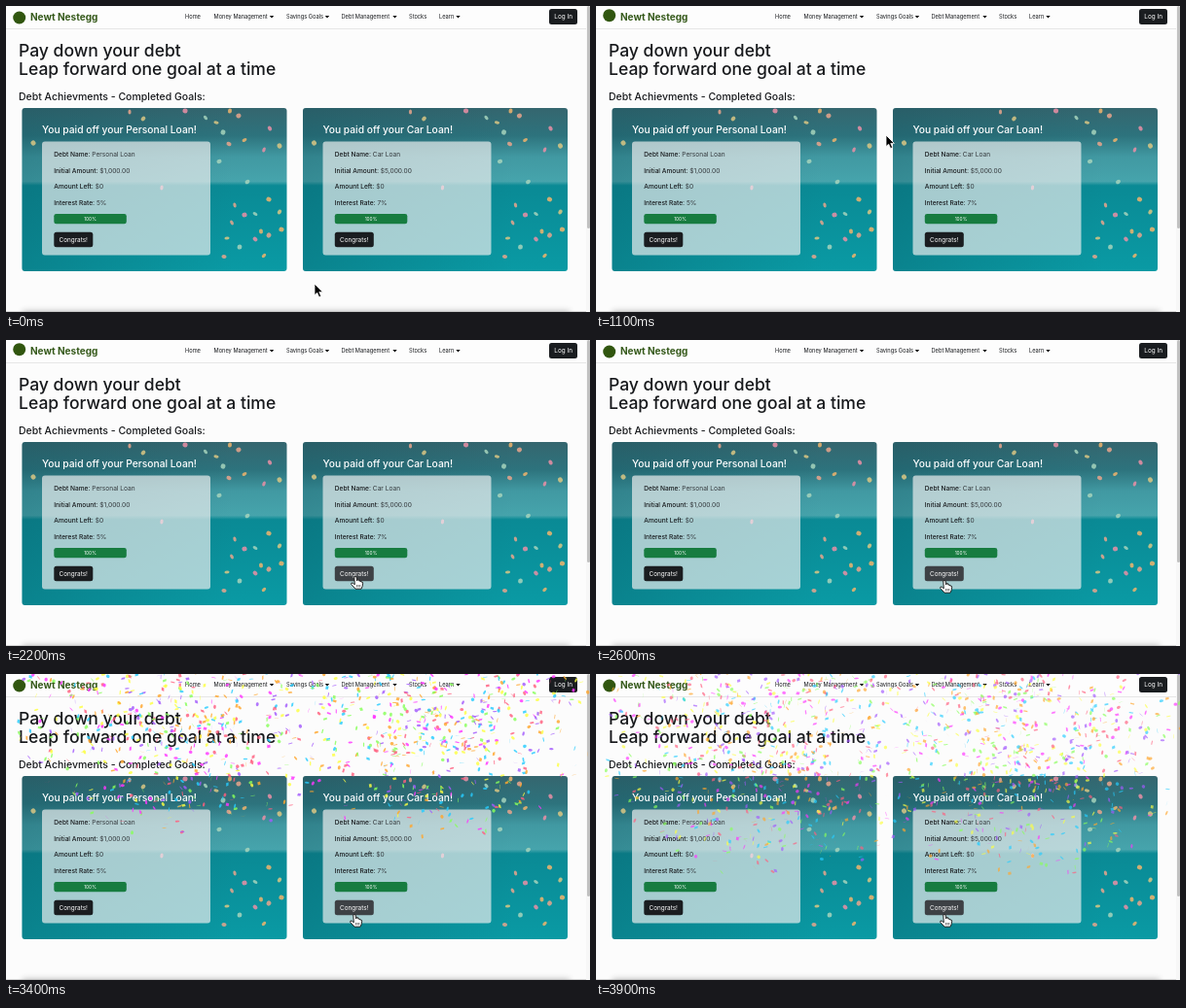
An HTML page with a canvas that plays this animation: 600x315 px, repeating every 4 s.

```html
<!DOCTYPE html>
<html lang="en">
<head>
<meta charset="utf-8">
<title>Debt goals</title>
<style>
  html, body { margin: 0; width: 100%; height: 100%; overflow: hidden; background: #fcfcfc; }
  svg, canvas { position: absolute; left: 0; top: 0; width: 600px; height: 315px; }
  text { font-family: Inter, sans-serif; fill: #17191c; }
  .h1 { font-size: 17.55px; font-weight: 500; }
  .h2 { font-size: 10.5px; font-weight: 500; }
  .title { font-size: 10.25px; font-weight: 500; fill: #fff; }
  .nav { font-size: 5.7px; }
  .row { font-size: 6.6px; }
  .label { font-weight: 500; }
  .value { fill: #33383c; }
  .button { font-size: 6.4px; fill: #fff; }
  .percent { font-size: 4.8px; fill: #fff; text-anchor: middle; }
  .brand { font-size: 10px; font-weight: 700; fill: #35591a; }
</style>
</head>
<body>
<svg viewBox="0 0 600 315">
  <defs>
    <linearGradient id="photo" x2="0" y2="1">
      <stop offset="0" stop-color="#35666f"/>
      <stop offset=".17" stop-color="#2d737d"/>
      <stop offset=".3" stop-color="#4199a2"/>
      <stop offset=".45" stop-color="#46a4ac"/>
      <stop offset=".475" stop-color="#0a8a95"/>
      <stop offset="1" stop-color="#0a9aa4"/>
    </linearGradient>
    <linearGradient id="shade">
      <stop offset="0" stop-color="#0a4a55" stop-opacity=".28"/>
      <stop offset=".8" stop-color="#0a4a55" stop-opacity="0"/>
    </linearGradient>
    <filter id="blur" x="-10%" y="-200%" width="120%" height="500%">
      <feGaussianBlur stdDeviation="3"/>
    </filter>
  </defs>
  <rect width="600" height="23" fill="#fdfdfd"/>
  <path d="M0 23.5H597" stroke="#e6e6e6"/>
  <circle id="logo" cx="13.7" cy="12" r="6.5" fill="#31560f"/>
  <text class="brand" x="25" y="15">Newt Nestegg</text>
  <g id="nav"></g>
  <rect x="558" y="3" width="29" height="16" rx="2.5" fill="#1a1d20"/>
  <text class="button" x="563.3" y="13.3">Log In</text>
  <text class="h1" x="13" y="51.5">Pay down your debt</text>
  <text class="h1" x="13" y="71.3">Leap forward one goal at a time</text>
  <text class="h2" x="13" y="97">Debt Achievments - Completed Goals:</text>
  <g id="cards"></g>
  <rect x="17" y="314" width="562" height="10" opacity=".25" filter="url(#blur)"/>
  <path d="M0 314.5H597" stroke="#bbb" stroke-opacity=".6"/>
  <rect x="596" width="4" height="315" fill="#f7f7f7"/>
  <rect x="597" width="3" height="229" rx="1.5" fill="#c1c1c1"/>
</svg>
<canvas width="600" height="315"></canvas>
<svg viewBox="0 0 600 315">
  <path id="arrow" d="M0 0V11.6L2.7 9.2 4.6 13.6 6.7 12.7 4.8 8.4H8.4Z" stroke="#fff" stroke-width=".8"/>
  <g id="hand" fill="#fff" stroke="#111" stroke-width=".9" stroke-linejoin="round">
    <path d="M-1.2 0Q0-1.4 1.1 0L1.7 4Q3-.1 3.9 4.2 5.2 3.2 5.9 5 7.4 4.4 7.6 6.2L7.2 9.4 6 12.2H0L-4.3 7.4Q-4.6 5.5-2.7 6.2L-.7 7.8Z"/>
    <path d="M1.6 8V10.4M3.2 8V10.4M4.8 8V10.4" fill="none" stroke-width=".6"/>
  </g>
</svg>
<script>
const LOOP = 4000, STEP = 100, BURST = 2800, SCALE = 600 / 1440;
const $ = id => document.getElementById(id);
const ctx = document.querySelector('canvas').getContext('2d');

let seed = 11;
const random = () => (seed = seed * 16807 % 2147483647) / 2147483647;

// Static page
const navItems = [['Home', 184], ['Money Management', 213.5, 273], ['Savings Goals', 288, 330],
  ['Debt Management', 344.5, 399.5], ['Stocks', 414], ['Learn', 445, 464.5]];
$('nav').innerHTML = navItems.map(([label, x, caret]) =>
  `<text class="nav" x="${x}" y="13">${label}</text>` +
  (caret ? `<path d="M${caret - 2.2} 10h4.4l-2.2 2.6z"/>` : '')).join('');

const specks = [[127, 109], [141, 116], [184, 108], [205, 115], [230, 108], [239, 113], [216, 120],
  [271, 126], [223, 130], [245, 138], [229, 142], [281, 144], [265, 148], [219, 160], [270, 199],
  [235, 205], [281, 212], [245, 215], [256, 214], [262, 232], [270, 236], [227, 239], [256, 240],
  [240, 248], [265, 257], [224, 258], [28, 141], [160, 187], [248, 181], [283, 230], [232, 223]];
const speckColors = ['#e9a58c', '#d9c784', '#ea8fa6', '#a6d3bc', '#f0b46c'];
const speckMarkup = specks.map(([x, y], i) =>
  `<ellipse cx="${x}" cy="${y}" rx="${1.6 + i % 3 * .4}" ry="2.6" fill="${speckColors[i % 5]}"
    opacity=".85" transform="rotate(${i * 47} ${x} ${y})"/>`).join('');

function card(name, amount, rate, x, id) {
  const rows = [['Debt Name', name + ' Loan'], ['Initial Amount', amount], ['Amount Left', '$0'], ['Interest Rate', rate]];
  return `<g transform="translate(${x})">
    <rect x="16.5" y="105" width="272" height="168" rx="3" fill="url(#photo)"/>
    <rect x="16.5" y="105" width="272" height="168" rx="3" fill="url(#shade)"/>
    ${speckMarkup}
    <text class="title" x="37" y="131">You paid off your ${name} Loan!</text>
    <rect x="37" y="139.5" width="173" height="117" rx="3" fill="#f1f1f1" fill-opacity=".68"/>
    ${rows.map(([label, value], i) => `<text class="row" x="49.3" y="${155.2 + i * 16.55}"><tspan
      class="label">${label}:</tspan> <tspan class="value">${value}</tspan></text>`).join('')}
    <rect x="49.3" y="214" width="74.5" height="10.3" rx="2.3" fill="#177c40"/>
    <text class="percent" x="86.5" y="221">100%</text>
    <rect id="${id}" x="49.3" y="232.7" width="40" height="15.6" rx="2.5" fill="#1a1d20"/>
    <text class="button" x="54.5" y="242.8">Congrats!</text>
  </g>`;
}
$('cards').innerHTML = card('Personal', '$1,000.00', '5%', 0, 'firstButton') +
  card('Car', '$5,000.00', '7%', 288.5, 'secondButton');

// Radial bursts from just above the top edge, in 1440px page units
const colors = ['#26ccff', '#a25afd', '#ff5e7e', '#88ff5a', '#fcff42', '#ffa62d', '#ff36ff'];
const origins = [365, 500, 995, 1120];
const pieces = Array.from({ length: 1800 }, (_, i) => ({
  x: origins[i % origins.length],
  y: -60,
  angle: random() * Math.PI * 2,
  speed: 6 + random() * 30,
  wobble: random() * 10,
  wobbleSpeed: Math.min(.11, random() * .1 + .05),
  tilt: (random() * .5 + .25) * Math.PI,
  size: random() + 2,
  round: random() < .5,
  color: colors[i % colors.length]
}));

function drawPiece(p, ticks) {
  const reach = p.speed * 10 * (1 - .9 ** ticks);
  const x = p.x + Math.cos(p.angle) * reach;
  const y = p.y + Math.sin(p.angle) * reach + 3 * ticks;
  const wobble = p.wobble + p.wobbleSpeed * ticks, tilt = p.tilt + .1 * ticks;
  const wx = x + 10 * Math.cos(wobble), wy = y + 10 * Math.sin(wobble);
  const dx = p.size * Math.cos(tilt), dy = p.size * Math.sin(tilt);
  ctx.fillStyle = p.color;
  ctx.beginPath();
  if (p.round) {
    ctx.ellipse(x, y, Math.abs(wx - x) * .6, Math.abs(wy - y) * .6, Math.PI / 10 * wobble, 0, Math.PI * 2);
  } else {
    ctx.moveTo(x, y);
    ctx.lineTo(wx, y + dy);
    ctx.lineTo(wx + dx, wy + dy);
    ctx.lineTo(x + dx, wy);
  }
  ctx.fill();
}

function drawConfetti(t) {
  ctx.setTransform(1, 0, 0, 1, 0, 0);
  ctx.clearRect(0, 0, 600, 315);
  if (t <= BURST) return;
  const ticks = (t - BURST) * .06;
  ctx.scale(SCALE, SCALE);
  ctx.globalAlpha = 1 - ticks / 200;
  pieces.forEach(p => drawPiece(p, ticks));
}

// Eased interpolation between [time, x, y] keys
function along(keys, t) {
  const next = keys.findIndex(k => k[0] > t);
  if (next < 0) return keys[keys.length - 1].slice(1);
  const a = keys[next - 1], b = keys[next], u = (t - a[0]) / (b[0] - a[0]);
  const ease = u * u * (3 - 2 * u);
  return [1, 2].map(i => a[i] + (b[i] - a[i]) * ease);
}
const pointerPath = [[0, 317, 286], [400, 317, 286], [1000, 298, 133], [1200, 298, 133],
  [1700, 360, 240], [2000, 360, 240], [2400, 358, 248]];
const hopPath = [[0, 0, 0], [700, 0, 0], [1700, 0, -6.5], [1900, 0, -6.5], [2400, 0, 0]];

function render(now) {
  const t = Math.floor(now % LOOP / STEP) * STEP;
  const overButton = t >= 1700;
  const place = `translate(${along(pointerPath, t)})`;
  for (const [id, visible] of [['arrow', !overButton], ['hand', overButton]]) {
    $(id).setAttribute('transform', place);
    $(id).style.display = visible ? '' : 'none';
  }
  $('logo').setAttribute('transform', `translate(${along(hopPath, t)})`);
  $('secondButton').setAttribute('fill', t >= 1900 ? '#3d4145' : '#1a1d20');
  drawConfetti(t);
}

const start = performance.now();
(function loop() {
  render(performance.now() - start);
  requestAnimationFrame(loop);
})();
</script>
</body>
</html>
```
